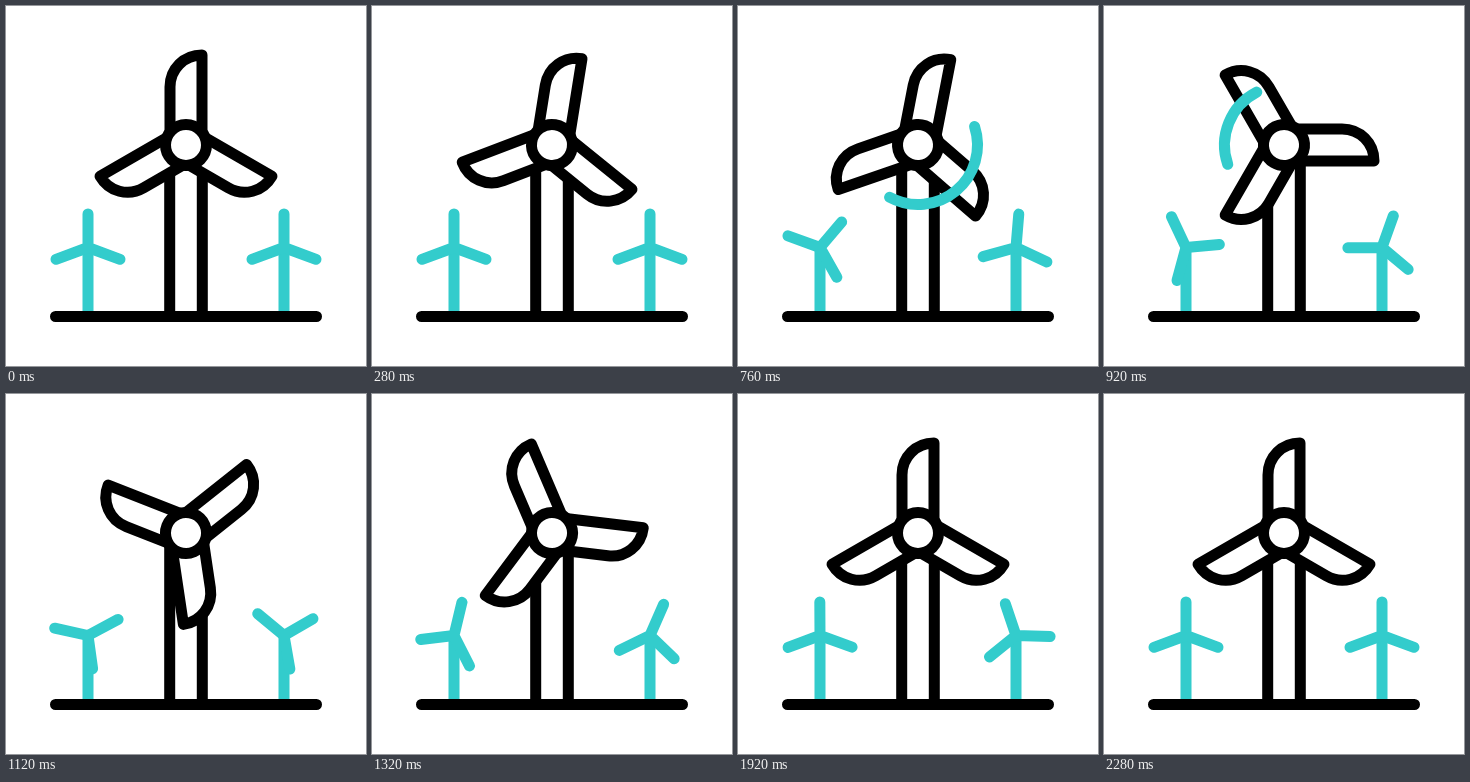
Recreate the animation shown at these times as an HTML page. Size 360 px wide and 360 px high, loop 2.32 s.

```html
<!DOCTYPE html>
<html lang="en">
<head>
<meta charset="utf-8">
<title>Wind turbines</title>
<style>
  html, body { margin: 0; width: 100%; height: 100%; overflow: hidden; background: #fff; }
  svg { display: block; width: 100vw; height: 100vh; }
  .line { fill: none; stroke-width: 11; stroke-linecap: round; stroke-linejoin: round; }
  .dark { stroke: #000; }
  .teal { stroke: #33cccc; }
  .solid { fill: #fff; }
</style>
</head>
<body>
<svg viewBox="0 0 360 360">
  <defs>
    <path id="blade" d="M-16 -14V-58C-16 -76 -2 -90 16 -90V-14"/>
    <path id="vane" d="M0 0V-33.5M0 0L32 11.8M0 0L-32 11.8"/>
  </defs>

  <g class="line teal">
    <path d="M82 241.5V306M278 241.5V306" stroke-linecap="butt"/>
    <use id="left" href="#vane"/>
    <use id="right" href="#vane"/>
  </g>

  <g class="line dark">
    <path d="M163.7 152V310M196.3 152V310M49.5 310.5H310.5"/>
    <g id="rotor" class="solid">
      <use href="#blade"/>
      <use href="#blade" transform="rotate(240)"/>
      <use href="#blade" transform="rotate(120) scale(-1 1)"/>
      <circle r="20.5"/>
    </g>
  </g>

  <path id="gust" class="line teal"/>
</svg>
<script>
  const LOOP = 2320, STEP = 40, HUB = { x: 180, y: 139 }, GUST_R = 59.5;
  const SHARP = 0.56, SOFT = 1 / 3;

  const turns = [
    { id: 'rotor', x: HUB.x, y: HUB.y, start: 50, time: 1620 },
    { id: 'left', x: 82, y: 241.5, start: 306, time: 1660 },
    { id: 'right', x: 278, y: 241.5, start: 586, time: 1660 }
  ];
  const head = { start: 442, time: 575 };
  const tail = { start: 628, time: 460 };
  const el = id => document.getElementById(id);

  // Symmetric ease: cubic-bezier(a, 0, 1 - a, 1)
  function ease(u, a) {
    if (u <= 0) return 0;
    if (u >= 1) return 1;
    let lo = 0, hi = 1;
    for (let i = 0; i < 24; i++) {
      const s = (lo + hi) / 2, r = 1 - s;
      const x = 3 * a * s * r * r + 3 * (1 - a) * s * s * r + s * s * s;
      if (x < u) lo = s; else hi = s;
    }
    return lo * lo * (3 - 2 * lo);
  }

  const angleAt = (t, move, a) => 360 * ease((t - move.start) / move.time, a);

  // Point on the gust circle, degrees clockwise from the top
  function point(deg) {
    const r = deg * Math.PI / 180;
    return (HUB.x + GUST_R * Math.sin(r)).toFixed(2) + ' ' +
           (HUB.y - GUST_R * Math.cos(r)).toFixed(2);
  }

  function arc(from, to) {
    if (to - from < 0.3) return '';
    const large = to - from > 180 ? 1 : 0;
    return `M${point(from)}A${GUST_R} ${GUST_R} 0 ${large} 1 ${point(to)}`;
  }

  function draw(t) {
    for (const m of turns) {
      const deg = angleAt(t, m, SHARP);
      el(m.id).setAttribute('transform', `translate(${m.x} ${m.y}) rotate(${deg.toFixed(3)})`);
    }
    el('gust').setAttribute('d', arc(angleAt(t, tail, SOFT), angleAt(t, head, SOFT)));
  }

  const origin = performance.now();
  function tick() {
    const t = (performance.now() - origin) % LOOP;
    draw(Math.floor(t / STEP) * STEP);
    requestAnimationFrame(tick);
  }
  draw(0);
  requestAnimationFrame(tick);
</script>
</body>
</html>
```
